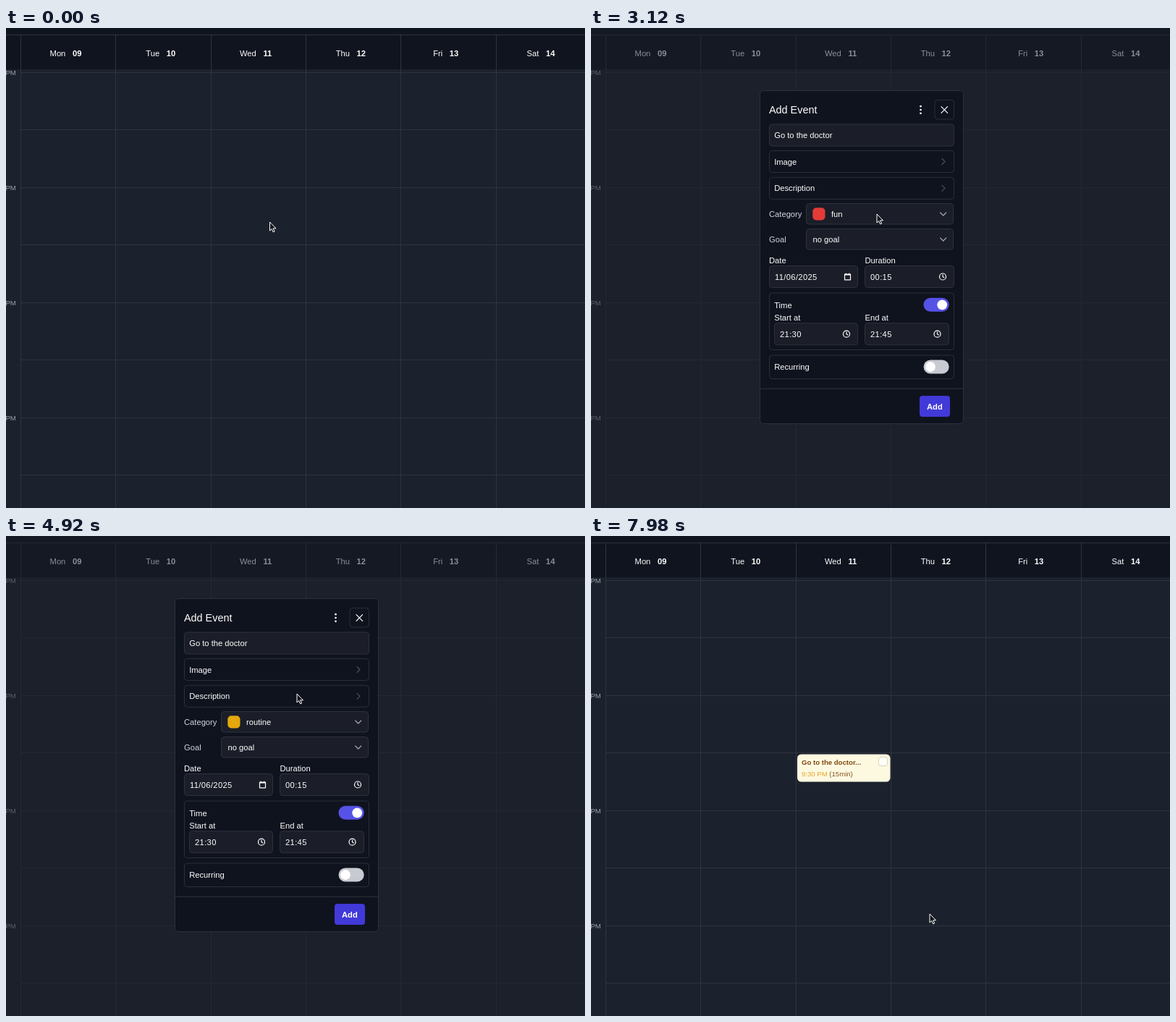
Animation, 800 px wide and 663 px high, one loop 8000 ms. Source, as an HTML page:

```html
<!DOCTYPE html>
<html lang="en">
<head>
<meta charset="utf-8">
<title>Add event</title>
<style>
html, body { margin: 0; width: 100%; height: 100%; overflow: hidden; background: #1c212c; }
svg { display: block; width: 800px; height: 663px; }
text { font: 11.2px "Liberation Sans", Arial, sans-serif; fill: #fff; white-space: pre; }
.bold { font-weight: 700; }
.heading { font-size: 14.4px; }
.muted { fill: #d0d3d9; }
.hour { font-size: 9.6px; fill: #9b9fa8; text-anchor: end; }
.field { letter-spacing: .35px; }
.small { font-size: 9.6px; }
.line { stroke: #2e333e; fill: none; }
.box { fill: #1b1e28; stroke: #2e323e; }
.panel { fill: none; stroke: #2a2f3a; }
.icon { fill: none; stroke: #fff; stroke-width: 1.2; stroke-linecap: round; stroke-linejoin: round; }
.faint { stroke: #4b505c; }
.soft { stroke: #a3a7af; }
</style>
</head>
<body>
<svg id="stage" viewBox="0 0 800 663" xmlns="http://www.w3.org/2000/svg">
  <defs><clipPath id="fold"><rect id="foldRect" x="246" y="232" width="256" height="0"/></clipPath></defs>
</svg>
<script>
const LOOP = 8000;
const TITLE = "Go to the doctor";
const ADDRESS = "Rue du Fovrel 82, 0473 Orbelieu";

function add(parent, tag, attrs, content) {
  const node = document.createElementNS("http://www.w3.org/2000/svg", tag);
  for (const key in attrs) node.setAttribute(key, attrs[key]);
  if (content !== undefined) node.textContent = content;
  parent.appendChild(node);
  return node;
}
const group = (parent, attrs = {}) => add(parent, "g", attrs);
const label = (parent, x, y, content, cls = "") => add(parent, "text", { x, y, class: cls }, content);
const path = (parent, d, cls = "icon", more = {}) => add(parent, "path", { d, class: cls, ...more });
const circle = (parent, cx, cy, r, attrs) => add(parent, "circle", { cx, cy, r, ...attrs });
const rect = (parent, x1, y1, x2, y2, attrs) =>
  add(parent, "rect", { x: x1, y: y1, width: x2 - x1, height: y2 - y1, rx: 4, ...attrs });
const box = (parent, x1, y1, x2, y2, cls = "box") => rect(parent, x1, y1, x2, y2, { class: cls });

const stage = document.getElementById("stage");

// Calendar
const calendar = group(stage);
rect(calendar, 0, 0, 800, 663, { fill: "#1c222d", rx: 0 });
rect(calendar, 0, 0, 800, 57, { fill: "#10141f", rx: 0 });
path(calendar, "M0 9.5H800", "line");
for (let i = 0; i < 8; i++) {
  path(calendar, `M20 ${Math.floor(61 + i * 79.5) + .5}H800`, "line");
  if (i % 2 === 0) label(calendar, 13.8, 65 + i * 79.5, `${8 + i / 2} PM`, "hour");
}
["Mon", "Tue", "Wed", "Thu", "Fri", "Sat"].forEach((day, i) => {
  const left = 20.5 + i * 131.3;
  path(calendar, `M${Math.floor(left) + .5} 10V663`, "line");
  const caption = label(calendar, left + 62, 39, "");
  caption.setAttribute("text-anchor", "middle");
  add(caption, "tspan", {}, day);
  add(caption, "tspan", { dx: 9.6, class: "bold" }, i ? 9 + i : "09");
});

const card = group(calendar);
rect(card, 285, 301.5, 413.5, 339.5, { fill: "#fdf9e1", rx: 5.5 });
label(card, 291, 315.5, TITLE + "...", "small bold").style.fill = "#7f4812";
label(card, 291, 331.7, "9:30 PM", "small").style.fill = "#e7a526";
label(card, 329.3, 331.7, "(15min)", "small").style.fill = "#87521c";
rect(card, 397.5, 305.5, 409.5, 317.5, { fill: "#fffefa", stroke: "#d9d5bf", rx: 2.5 });

// Dialog, laid out with both sections folded
const overlay = group(stage);
rect(overlay, 0, 0, 800, 663, { fill: "#1a1f2a", opacity: .5, rx: 0 });
const dialog = group(overlay);
const frame = rect(dialog, 233.5, 86.5, 514.5, 546.5, { fill: "#0f131e", stroke: "#2b303c", rx: 5 });

label(dialog, 246, 118, "Add Event", "heading");
for (const y of [108.2, 113, 117.8]) circle(dialog, 455.5, y, 1.35, { fill: "#fff" });
box(dialog, 475, 99.5, 501.5, 126, "panel");
path(dialog, "M484 108.7l8.6 8.6m0-8.6l-8.6 8.6");
box(dialog, 246.5, 133, 501.5, 163);
const focusRing = rect(dialog, 246.5, 133, 502, 163, { fill: "none", stroke: "#544fe2", "stroke-width": 1.8 });
const titleText = label(dialog, 253.2, 152, "");
const titleCaret = rect(dialog, 0, 141.5, 1, 154.5, { fill: "#fff", rx: 0 });

function section(parent, y, name) {
  const outline = box(parent, 246.5, y, 501.5, y + 30, "panel");
  label(parent, 253.2, y + 19, name);
  const chevron = path(parent, "M-2 -4L2 0L-2 4", "icon faint");
  return { outline, setOpen(open, extra) {
    outline.setAttribute("height", 30 + extra);
    chevron.setAttribute("transform", `translate(487 ${y + 15}) rotate(${open ? 90 : 0})`);
  } };
}
const imageSection = section(dialog, 169.5, "Image");
const belowImage = group(dialog);
const noteSection = section(belowImage, 206.3, "Description");

const note = group(group(belowImage, { "clip-path": "url(#fold)" }));
const toolIcons = [
  "M6 12h9a4 4 0 0 1 0 8H7a1 1 0 0 1-1-1V5a1 1 0 0 1 1-1h7a4 4 0 0 1 0 8",
  "M19 4H10M14 20H5M15 4L9 20",
  "M3 5h6v6H3zM3 17l2 2 4-4M13 6h8M13 12h8M13 18h8"
];
toolIcons.forEach((d, i) => {
  const x = 264 + i * 27;
  box(note, x - 10.5, 235.5, x + 10.5, 256.5, "panel");
  path(note, d, "icon", { transform: `translate(${x - 6.2} 239.8) scale(.52)`, style: "stroke-width:2.2" });
});
box(note, 253.5, 259.5, 494.5, 386.5);
const noteText = label(note, 260.3, 275, "");
const noteCaret = rect(note, 0, 265, 1, 278, { fill: "#fff", rx: 0 });

const form = group(belowImage);
const downChevron = y => path(form, `M482.7 ${y - 2}l4 4 4-4`, "icon soft");
const clock = (x, y) => {
  circle(form, x, y, 4.5, { class: "icon" });
  path(form, `M${x} ${y - 2.7}V${y}l1.8 1.2`);
};
const toggle = (y, on) => {
  rect(form, 459.5, y - 9.5, 494.7, y + 9.5, { fill: on ? "#5552e6" : "#c7cad0", rx: 9.5 });
  circle(form, on ? 485.2 : 469, y, 6.9, { fill: "#fff" });
};
const input = (x1, y1, x2, value) => {
  box(form, x1, y1, x2, y1 + 30);
  label(form, x1 + 7.5, y1 + 19, value, "field");
};

label(form, 246, 261, "Category", "muted");
box(form, 297.5, 242.5, 500.5, 271);
const swatch = rect(form, 306.3, 248.3, 323.5, 265.5, { rx: 5 });
const categoryText = label(form, 332, 261, "");
downChevron(257);
label(form, 246, 296, "Goal", "muted");
box(form, 297.5, 277.5, 500.5, 306);
label(form, 306.5, 296, "no goal");
downChevron(292);

label(form, 246, 324.7, "Date");
label(form, 378.5, 324.7, "Duration");
input(246.5, 328.5, 368.5, "11/06/2025");
path(form, "M350.5 340h8v7.8h-8zM350.5 341h8M352.3 339v1M356.7 339v1");
input(378.5, 328.5, 501.5, "00:15");
clock(486, 343.5);

box(form, 246.5, 366, 501.5, 444.5, "panel");
label(form, 253.2, 386.5, "Time");
toggle(382.3, true);
label(form, 253.2, 403.7, "Start at");
label(form, 378.5, 403.7, "End at");
input(253.5, 407.7, 368.5, "21:30");
clock(353, 422.7);
input(378.5, 407.7, 494.5, "21:45");
clock(478.5, 422.7);

box(form, 246.5, 452, 501.5, 484.5, "panel");
label(form, 253.2, 472.3, "Recurring");
toggle(468, false);
path(form, "M234 498.2H514", "line");
rect(form, 454, 508, 496, 537, { fill: "#4239d9" });
label(form, 464, 526.5, "Add", "bold");

const pointer = path(stage, "M0 0V12L2.7 9.5 4.6 13.8 6.6 13 4.7 8.8H8.5Z", "",
  { fill: "#10131b", stroke: "#fff", "stroke-width": 1, "stroke-linejoin": "round" });

// Motion
const pointerPath = [
  [0, 364.5, 268], [60, 364.5, 268], [380, 352, 312], [2560, 352, 312], [2760, 395, 257],
  [3560, 395, 257], [3850, 391, 183], [4300, 391, 183], [4480, 398, 126], [4560, 398, 126],
  [4860, 402, 218], [5800, 402, 218], [6000, 396, 178], [6300, 424, 141], [6690, 424, 141],
  [6840, 436, 230], [7400, 468, 522], [LOOP, 468, 522]
];
const within = (t, from, to) => t >= from && t < to;
const smooth = (t, from, to) => {
  const x = Math.min(1, Math.max(0, (t - from) / (to - from)));
  return x * x * (3 - 2 * x);
};
const pulse = (t, open, close, duration) =>
  smooth(t, open, open + duration) - smooth(t, close, close + duration);
const show = (node, visible) => node.setAttribute("visibility", visible ? "visible" : "hidden");
const shift = (node, y) => node.setAttribute("transform", `translate(0 ${y})`);

function placePointer(t) {
  const i = pointerPath.findIndex(key => key[0] > t);
  const [t0, x0, y0] = pointerPath[i - 1], [t1, x1, y1] = pointerPath[i];
  const p = smooth(t, t0, t1);
  pointer.setAttribute("transform", `translate(${x0 + (x1 - x0) * p} ${y0 + (y1 - y0) * p})`);
  show(pointer, !within(t, 900, 2560));
}

function setTyped(textNode, caret, value, caretOn) {
  if (textNode.textContent !== value) textNode.textContent = value;
  const width = value ? textNode.getComputedTextLength() : 0;
  caret.setAttribute("x", +textNode.getAttribute("x") + width);
  show(caret, caretOn);
}

function render(t) {
  show(card, t >= 7680);
  overlay.setAttribute("opacity", pulse(t, 420, 7680, 190));

  const focused = within(t, 600, 2640);
  show(focusRing, focused);
  const typed = Math.max(0, Math.floor((t - 900) / 68));
  setTyped(titleText, titleCaret, TITLE.slice(0, typed), focused && t < 2500);

  const routine = t >= 3200;
  swatch.setAttribute("fill", routine ? "#e4a80c" : "#e53b38");
  categoryText.textContent = routine ? "routine" : "fun";

  const imageExtra = 119 * pulse(t, 3960, 4560, 210);
  const unfold = pulse(t, 5170, 6696, 212);
  const noteExtra = 158 * unfold;
  imageSection.setOpen(within(t, 3960, 4560), imageExtra);
  noteSection.setOpen(within(t, 5170, 6696), noteExtra);
  frame.setAttribute("height", 460 + imageExtra + noteExtra);
  shift(dialog, -(imageExtra + noteExtra) / 2);
  shift(belowImage, imageExtra);
  shift(form, noteExtra);
  shift(note, -6 * (1 - unfold));
  document.getElementById("foldRect").setAttribute("height", Math.max(0, noteExtra - 2.5));
  setTyped(noteText, noteCaret, t >= 5700 ? ADDRESS : "", within(t, 5450, 6690));

  placePointer(t);
}

function tick() {
  render(performance.now() % LOOP);
  requestAnimationFrame(tick);
}
tick();
</script>
</body>
</html>
```
